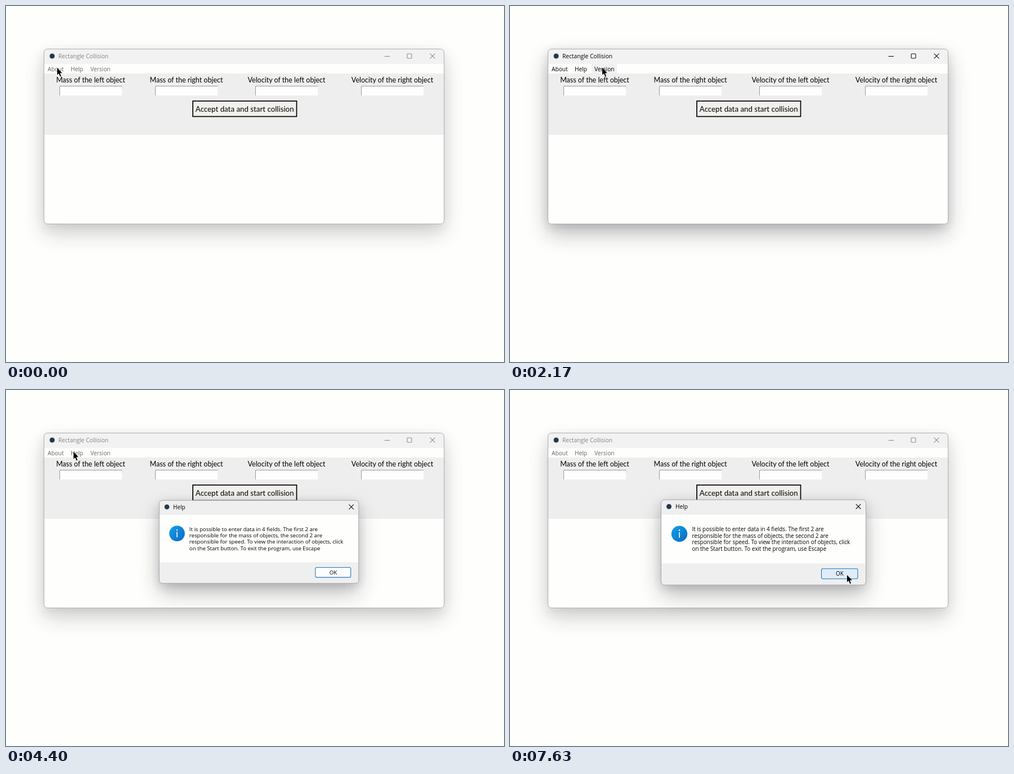
Animation of 885 by 633 pixels, one loop 8 s. Source, as an HTML page:

```html
<!DOCTYPE html>
<html lang="en">
<head>
<meta charset="utf-8">
<title>Rectangle Collision</title>
<style>
  html, body { margin: 0; width: 100%; height: 100%; overflow: hidden; background: #fefefc; }
  svg { display: block; width: 885px; height: 633px; }
  text { white-space: pre; fill: #000; }
  .mid { text-anchor: middle; }
  .ui { font: 10.2px "Open Sans", "Noto Sans", sans-serif; }
  .msg { font: 9.9px "Open Sans", "Noto Sans", sans-serif; }
  .label { font: 12.5px Lato, sans-serif; }
  .start { font: 13.3px Lato, sans-serif; }
  .glyph { fill: none; stroke: #111; stroke-width: 1.1; }
  .idle .ui { fill: #858585; }
  .idle .menu { fill: #666; }
  .idle .glyph { stroke: #8c8c8c; }
</style>
</head>
<body>
<svg id="stage" viewBox="0 0 885 633" xmlns="http://www.w3.org/2000/svg">
  <defs>
    <filter id="wide" x="-50%" y="-80%" width="200%" height="260%"><feGaussianBlur stdDeviation="19"/></filter>
    <filter id="tight" x="-50%" y="-80%" width="200%" height="260%"><feGaussianBlur stdDeviation="9"/></filter>
    <linearGradient id="blue" x1="0" y1="0" x2="1" y2="1">
      <stop offset="0" stop-color="#17a2e6"/><stop offset="1" stop-color="#0768c4"/>
    </linearGradient>
  </defs>
</svg>
<script>
const LOOP = 8000, CLOSE_TIME = 130, OPEN_TIME = 180;
const stage = document.getElementById('stage');
const byId = id => document.getElementById(id);

const rect = (x, y, w, h, fill, more = '') =>
  `<rect x="${x}" y="${y}" width="${w}" height="${h}" fill="${fill}" ${more}/>`;
const text = (x, y, cls, str) => `<text x="${x}" y="${y}" class="${cls}">${str}</text>`;
const cross = (x, y, r) =>
  `<path class="glyph" d="M${x - r} ${y - r}l${2 * r} ${2 * r}m0 ${-2 * r}l${-2 * r} ${2 * r}"/>`;
const badge = (x, y) => `<circle cx="${x}" cy="${y}" r="4.5" fill="#22384f"/>`;
const shadow = (x, y, w, h, id) => `<g id="${id}">` +
  rect(x, y + 18, w, h, '#1c1c28', 'rx="7" filter="url(#wide)" opacity=".28"') +
  rect(x, y + 6, w, h, '#1c1c28', 'rx="7" filter="url(#tight)" opacity=".14"') + '</g>';

const menu = [{ name: 'About', x: 74 }, { name: 'Help', x: 115 }, { name: 'Version', x: 150 }];
menu.forEach((m, i) => {
  m.left = m.x - 5;
  m.right = (menu[i + 1]?.x ?? 195) - 5;
});

const field = ([name, cx]) => text(cx, 136, 'label mid', name) +
  rect(cx - 55.5, 142, 111, 17, '#fefefe') +
  `<path d="M${cx - 55} 159V142.5h111" fill="none" stroke="#9a9a9a"/>`;

const mainWindow = () => shadow(67, 76, 711, 311, 'glow') + '<g id="win">' +
  rect(67.5, 76.5, 711, 311, '#fefefc', 'rx="6"') +
  '<path d="M68 103V83Q68 77 74 77H772Q778 77 778 83V103Z" fill="#f2f2f2"/>' +
  rect(68, 120, 710, 109, '#eeeeee') +
  rect(0, 103, 0, 17, '#f1f1f2', 'id="hover"') +
  badge(82, 89) + text(93, 93, 'ui', 'Rectangle Collision') +
  '<path class="glyph" d="M672.5 89.5h9.5"/>' +
  '<rect class="glyph" x="713" y="85" width="8" height="8" rx="1.2"/>' + cross(758, 89, 4.4) +
  menu.map(m => text(m.x, 115.7, 'ui menu', m.name)).join('') +
  [['Mass of the left object', 150.5], ['Mass of the right object', 320.5],
   ['Velocity of the left object', 498.5], ['Velocity of the right object', 686.5]].map(field).join('') +
  rect(332, 169, 184.5, 27.5, '#f2f0ec', 'stroke="#000" stroke-width="1.7"') +
  text(424.2, 187.5, 'start mid', 'Accept data and start collision') +
  rect(67.5, 76.5, 711, 311, 'none', 'rx="6" stroke="#b0b0b4"') + '</g>';

const dialogs = [
  { title: 'About', w: 140, open: 30, close: 900, lines: ['Physics demo'] },
  { title: 'Version', w: 140, open: 2250, close: 3000, lines: ['Version 1.0'] },
  { title: 'Help', w: 364, open: 4313, close: LOOP, lines: [
    'It is possible to enter data in 4 fields. The first 2 are',
    'responsible for the mass of objects, the second 2 are',
    'responsible for speed. To view the interaction of objects, click',
    'on the Start button. To exit the program, use Escape'] }
];
// every dialog is centred on the same point and grows with its text
dialogs.forEach(d => {
  d.h = 65 + Math.max(77, 40 + 11.65 * d.lines.length);
  d.x = 450 - d.w / 2;
  d.y = 270.5 - d.h / 2;
});

function dialogBox({ title, lines, w, h }, i) {
  const top = lines.length > 1 ? 56.5 : 64.5;
  return `<g id="dlg${i}">` + shadow(0, 0, w, h, 'glow' + i) +
    rect(.5, .5, w, h, '#efeff0', 'rx="6"') +
    rect(1, 27, w - 1, h - 65, '#fefefd') +
    badge(14.5, 12.5) + text(26, 16.7, 'ui', title) + cross(w - 13, 12.5, 4.3) +
    '<circle cx="33" cy="61" r="14.2" fill="url(#blue)"/><circle cx="33" cy="54.6" r="1.2" fill="#fff"/>' +
    rect(32.2, 58, 1.6, 10, '#fff') +
    lines.map((s, n) => text(55.5, top + n * 11.65, 'msg', s)).join('') +
    rect(w - 78.5, h - 28.5, 64.5, 18, '#fdfdfd', `rx="2.5" stroke="#1d78bd" stroke-width="1.1" id="ok${i}"`) +
    text(w - 46, h - 15.8, 'msg mid', 'OK') +
    rect(.5, .5, w, h, 'none', 'rx="6" stroke="#a9a9ae"') + '</g>';
}

stage.insertAdjacentHTML('beforeend', mainWindow() + dialogs.map(dialogBox).join('') +
  '<path id="cursor" d="M0 0V12.6L2.9 10L5.2 15.6L7 14.8L4.8 9.3H8.8Z"/>');

// pointer moves: from, to, and the point reached; it rests in between
const home = [91, 110], ok = [477, 322];
const moves = [
  [30, 830, ok], [900, 1270, [339, 262]], [1370, 2000, [164, 110]],
  [2200, 2530, ok], [3000, 3770, home], [4000, 4130, [120, 110]],
  [4470, 4930, [613, 297]], [5100, 5270, [622, 309]],
  [5430, 5900, [544, 242]], [6030, 6600, [599, 329]]
];

const clamp = v => Math.min(1, Math.max(0, v));
const smooth = p => p * p * (3 - 2 * p);

const pointer = t => moves.reduce(([x, y], [from, to, [nx, ny]]) => {
  const p = smooth(clamp((t - from) / (to - from)));
  return [x + (nx - x) * p, y + (ny - y) * p];
}, home);

function drawDialog(d, i, t, cx, cy) {
  const g = byId('dlg' + i);
  const shown = t >= d.open && t < d.close + CLOSE_TIME;
  g.style.display = shown ? '' : 'none';
  if (!shown) return;
  const p = clamp((t - d.open) / OPEN_TIME), q = clamp((t - d.close) / CLOSE_TIME);
  const scale = 1 - .1 * (1 - p) ** 2 - .08 * q;
  const ox = d.x + d.w * .4 * (1 - scale), oy = d.y + d.h * .25 * (1 - scale);
  g.setAttribute('transform', `translate(${ox} ${oy}) scale(${scale})`);
  g.setAttribute('opacity', Math.min(1, 3 * p) * (1 - q));
  const u = d.x + d.w - cx, v = d.y + d.h - cy;
  const over = u > 14 && u < 79 && v > 10 && v < 29;
  byId('ok' + i).setAttribute('fill', over ? '#e0edf8' : '#fdfdfd');
}

function draw(t) {
  const [cx, cy] = pointer(t);
  byId('cursor').setAttribute('transform', `translate(${cx} ${cy})`);

  // the main window loses focus just before a dialog appears
  const idle = dialogs.some(d => t >= d.open - 60 && t < d.close);
  byId('win').setAttribute('class', idle ? 'idle' : '');
  byId('glow').setAttribute('opacity', idle ? .68 : 1);

  const item = !idle && cy >= 103 && cy < 120 && menu.find(m => cx >= m.left && cx < m.right);
  byId('hover').setAttribute('x', item ? item.left : 0);
  byId('hover').setAttribute('width', item ? item.right - item.left : 0);

  dialogs.forEach((d, i) => drawDialog(d, i, t, cx, cy));
}

const start = performance.now();
function tick() {
  draw((performance.now() - start) % LOOP);
  requestAnimationFrame(tick);
}
tick();
</script>
</body>
</html>
```
